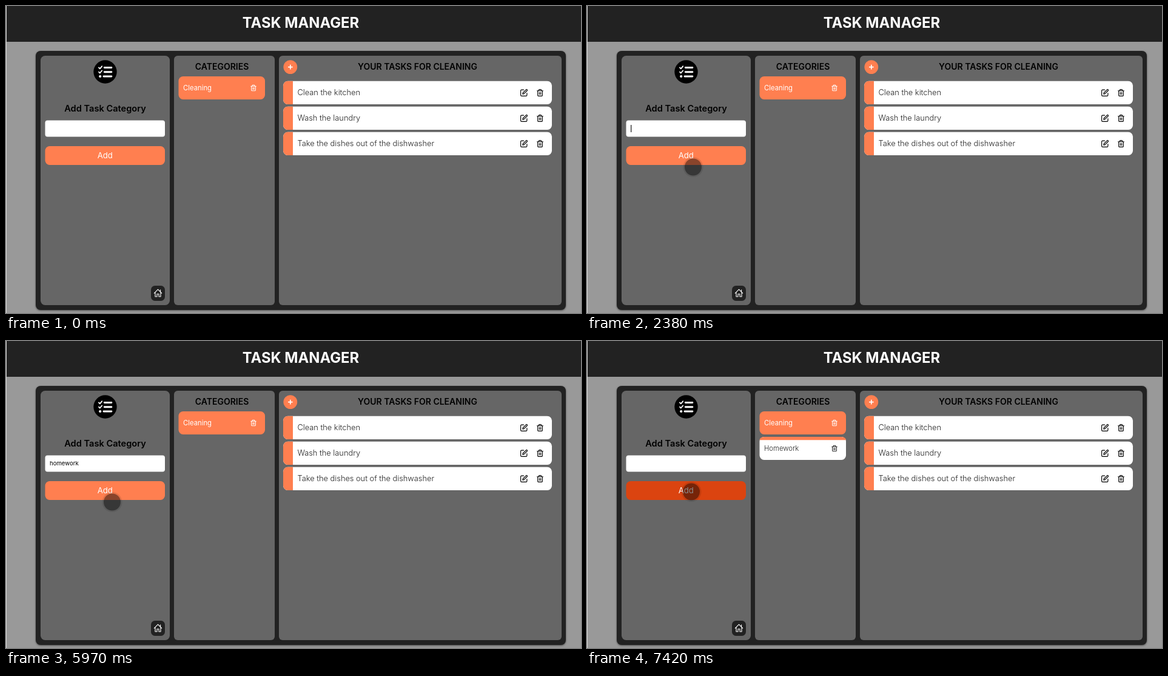
An HTML page for the animation above (8 s loop, 948 by 506 pixels).

```html
<!DOCTYPE html>
<html lang="en">
<head>
<meta charset="utf-8">
<title>Task manager</title>
<style>
  html, body { margin: 0; width: 100%; height: 100%; overflow: hidden; background: #999; }
  svg { display: block; width: 948px; height: 506px; font-family: Inter, "Open Sans", sans-serif; }
  .mid { text-anchor: middle; }
  .heading { font-size: 14px; font-weight: 600; }
  .item { font-size: 12.8px; font-weight: 300; fill: #222; }
  .small { font-size: 11.3px; }
  .icon { fill: none; stroke-width: 2.2; stroke-linecap: round; stroke-linejoin: round; }
  .panel { fill: #666; }
  .coral { fill: #ff7f50; }
</style>
</head>
<body>
<svg viewBox="0 0 948 506">
  <defs>
    <filter id="shadow" x="-5%" y="-5%" width="110%" height="110%">
      <feDropShadow dx="0" dy="1" stdDeviation="1.5" flood-opacity=".5"/>
    </filter>
    <symbol id="trash" viewBox="0 0 24 24">
      <path class="icon" d="M3 6h18M19 6v14a2 2 0 0 1-2 2H7a2 2 0 0 1-2-2V6M8 6V4a2 2 0 0 1 2-2h4a2 2 0 0 1 2 2v2M10 11v6M14 11v6"/>
    </symbol>
    <symbol id="edit" viewBox="0 0 24 24">
      <path class="icon" d="M11 3H5a3 3 0 0 0-3 3v13a3 3 0 0 0 3 3h13a3 3 0 0 0 3-3v-6M18.5 2.5a2.1 2.1 0 0 1 3 3L12 15l-4 1 1-4z"/>
    </symbol>
  </defs>

  <rect width="948" height="506" fill="#999"/>
  <rect width="948" height="59" fill="#222"/>
  <rect width="1" height="506" fill="#ddd"/>
  <text class="mid" x="486" y="36" font-size="23.8" font-weight="700" fill="#fff">TASK MANAGER</text>

  <rect x="49" y="74" width="874" height="427" rx="8" fill="#222" filter="url(#shadow)"/>
  <rect class="panel" x="57" y="82" width="213" height="411" rx="7.5"/>
  <rect class="panel" x="277" y="82" width="166" height="411" rx="6"/>
  <rect class="panel" x="450" y="82" width="466" height="411" rx="6"/>

  <!-- Sidebar -->
  <circle cx="163.5" cy="108.5" r="19.2"/>
  <g fill="none" stroke="#fff" stroke-linecap="round" stroke-linejoin="round">
    <path stroke-width="1.8" d="M153 101.5l1.8 1.8 3.4-4M153 108.7l1.8 1.8 3.4-4"/>
    <path stroke-width="2.9" d="M162.3 101.5h11.6M162.3 108.7h11.6M161 116h12.9"/>
    <path stroke-width="4.2" d="M155.2 116h.01"/>
  </g>
  <text class="mid heading" x="163.5" y="174" style="font-size:14.6px">Add Task Category</text>
  <rect x="64.5" y="188.5" width="197.5" height="27" rx="4" fill="#fff"/>
  <text id="typed" x="72" y="205" font-size="9.6"></text>
  <rect id="caret" y="196" width="1.1" height="12"/>
  <rect id="button" x="64.5" y="231" width="197.5" height="31" rx="7.5"/>
  <text id="label" class="mid" x="163.3" y="250.8" font-size="13.2">Add</text>
  <rect x="239" y="461" width="23" height="25" rx="6.5" fill="#222"/>
  <path d="M244.3 473.3l6.2-6.2 6.2 6.2M246 472v7h3v-4.3h3v4.3h3v-7M254.6 470.8v-3" fill="none"
        stroke="#fff" stroke-width="1.1" stroke-linecap="round" stroke-linejoin="round"/>

  <!-- Categories -->
  <text class="mid heading" x="356" y="105">CATEGORIES</text>
  <rect class="coral" x="284.5" y="116" width="142.5" height="38" rx="7.5"/>
  <text class="small" x="292" y="139.3" fill="#fff">Cleaning</text>
  <use href="#trash" x="402.3" y="129.3" width="11.4" height="11.4" stroke="#fff"/>
  <g id="added">
    <rect x="284.5" y="158" width="142.5" height="38" rx="7.5" fill="#fff"/>
    <path class="coral" d="M284.5 163.3a7.5 5.3 0 0 1 7.5-5.3h127.500a7.5 5.3 0 0 1 7.5 5.3z"/>
    <text class="small" x="292" y="181.3" font-weight="300" fill="#222">Homework</text>
    <use href="#trash" x="402.3" y="171.3" width="11.4" height="11.4" stroke="#222"/>
  </g>

  <!-- Tasks -->
  <circle class="coral" cx="468.8" cy="100.6" r="11.4"/>
  <path d="M465 100.6h7.600M468.8 96.800v7.600" stroke="#fff" stroke-width="1.6"/>
  <text class="mid heading" x="678.5" y="105">YOUR TASKS FOR CLEANING</text>
  <g id="tasks"></g>

  <g id="bars" fill="#fff"></g>
  <g id="pointer">
    <circle id="ring" r="16.5"/>
    <circle r="14" fill-opacity=".4"/>
  </g>
</svg>
<script>
const LOOP = 8000;
const get = id => document.getElementById(id);
const [typed, caret, button, label, added, bars, pointer, ring] =
  ['typed', 'caret', 'button', 'label', 'added', 'bars', 'pointer', 'ring'].map(get);

get('tasks').innerHTML = ['Clean the kitchen', 'Wash the laundry', 'Take the dishes out of the dishwasher']
  .map((task, i) => `<g transform="translate(457 ${123.7 + i * 42})">
    <rect width="443" height="38.300" rx="7.5" fill="#fff"/>
    <path class="coral" d="M16 0H7.5A7.5 7.5 0 0 0 0 7.500V30.800A7.5 7.5 0 0 0 7.5 38.300H16z"/>
    <text class="item" x="23.5" y="23.600">${task}</text>
    <use href="#edit" x="390.5" y="12.800" width="13" height="13" stroke="#000"/>
    <use href="#trash" x="417" y="12.800" width="13" height="13" stroke="#000"/>
  </g>`).join('');

bars.innerHTML = Array.from({ length: 5 }, (_, i) =>
  `<rect x="${151.8 + i * 5.1}" y="149.500" width="2.4" height="20.500" rx="1"/>`).join('');

// Each track lists [start time, value]; a value holds until the next entry.
const pointerTrack = [
  [380, [404, 414]], [530, [275, 340]], [660, [181, 274]], [790, [163, 247]],
  [920, [151, 228]], [1040, [145, 216]], [1170, [143.5, 212]],
  [1850, [163, 243]], [1980, [175, 265.5]], [6230, [173, 254]], [6360, [172, 248.5]]
];
const ringTrack = [[0, 0], [530, .1], [1320, .22], [1850, .1], [6620, .16], [7160, .1]];
const caretTrack = [
  [0, 0], [1320, 1], [1850, 0], [2380, 1], [2910, 0], [3040, 1],
  [4370, 0], [4630, 1], [5970, 0], [6360, 1], [6890, 0]
];
const keyTimes = [3040, 3300, 3570, 3840, 4630, 4760, 5290, 5440];
const buttonTrack = [[0, ['#ff7f50', '#fff']], [7160, ['#a88f86', '#9fb6be']], [7420, ['#db4410', '#fff']]];

const at = (track, t) => track.findLast(([start]) => start <= t)?.[1];
const show = (node, visible) => node.setAttribute('visibility', visible ? 'visible' : 'hidden');

function draw() {
  const t = performance.now() % LOOP;
  const done = t >= 7420;

  typed.textContent = done ? '' : 'homework'.slice(0, keyTimes.filter(k => k <= t).length);
  caret.setAttribute('x', 72.2 + (typed.textContent ? typed.getComputedTextLength() : 0));
  show(caret, at(caretTrack, t));

  const [fill, ink] = at(buttonTrack, t);
  button.setAttribute('fill', fill);
  label.setAttribute('fill', ink);
  show(added, done);
  show(bars, t >= 7160 && !done);

  const position = at(pointerTrack, t);
  show(pointer, position);
  if (position) pointer.setAttribute('transform', `translate(${position})`);
  ring.setAttribute('fill-opacity', at(ringTrack, t));

  requestAnimationFrame(draw);
}
draw();
</script>
</body>
</html>
```
